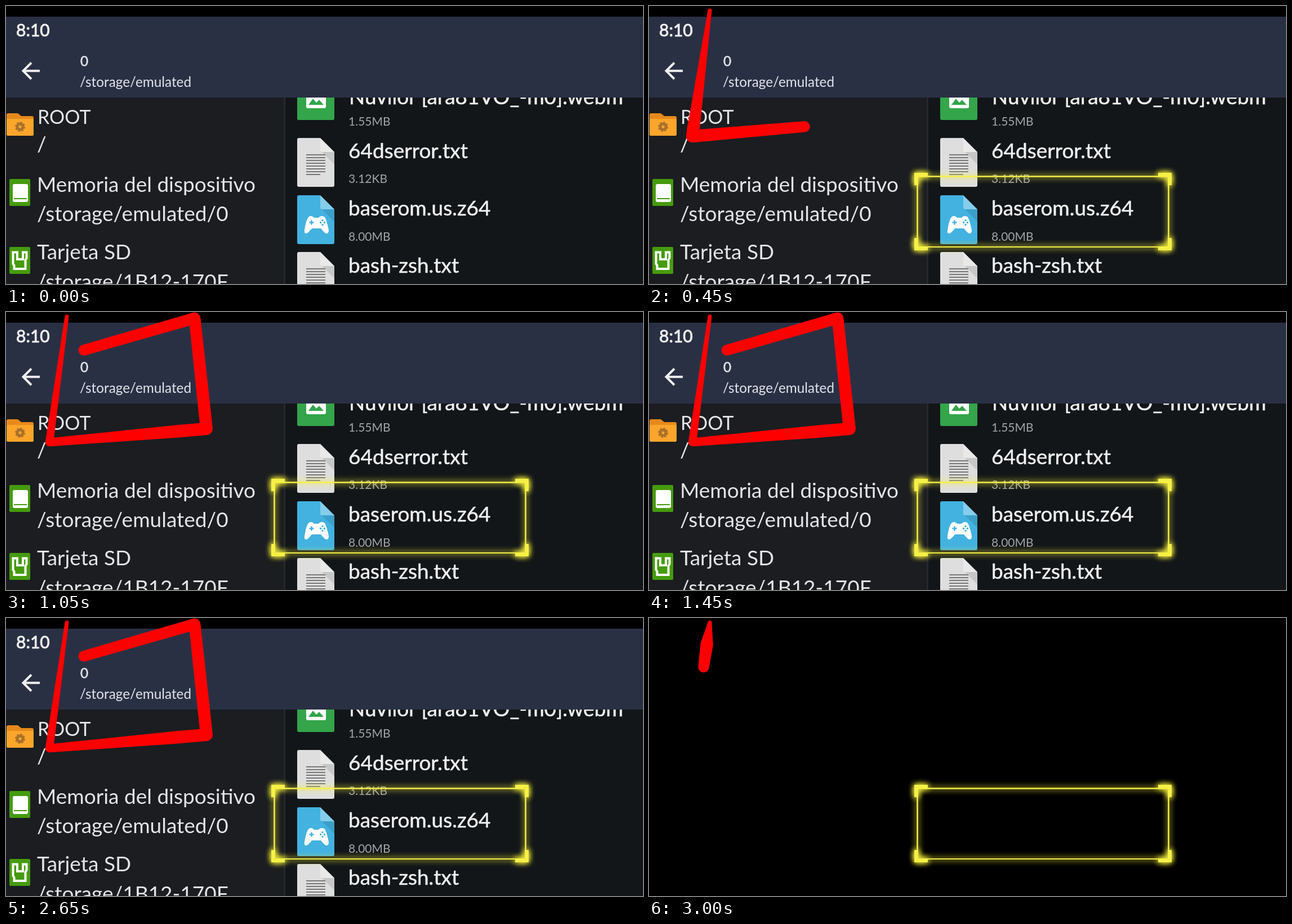
Write an HTML page with a canvas that moves like this. It is 1131 px wide and 495 px high and loops after 3050 ms.

```html
<!DOCTYPE html>
<html lang="es">
<head>
<meta charset="utf-8">
<title>File manager</title>
<style>
html, body { margin: 0; width: 100%; height: 100%; overflow: hidden; background: #000; }
svg, canvas { position: absolute; left: 0; top: 0; width: 1131px; height: 495px; }
text { font-family: Lato, "Open Sans", sans-serif; font-size: 37px; fill: #f1f1f1; }
.side { fill: #e4e5e7; }
.name { stroke: #f1f1f1; stroke-width: .5; }
.size { font-size: 21px; fill: #a3a5a7; }
.path { font-size: 24.3px; fill: #e3e5ec; }
.clock { font-size: 30px; stroke: #f1f1f1; stroke-width: .9; }
</style>
</head>
<body>
<svg id="screen" viewBox="0 0 1131 495">
  <defs>
    <clipPath id="list"><rect y="163" width="1131" height="332"/></clipPath>
    <g id="sheet">
      <path d="M520 0H558L583 25V84Q583 87 580 87H520Q517 87 517 84V3Q517 0 520 0Z"/>
      <path d="M558 0 583 25H561Q558 25 558 22Z" fill="#fff" fill-opacity=".35"/>
      <path d="M561 25H583V47Z" fill="#000" fill-opacity=".1"/>
    </g>
    <g id="doc">
      <use href="#sheet" fill="#dedede"/>
      <path d="M533 30H567M533 35H567M533 40H567M533 45H567M533 50H567M533 55H567M533 60H567M533 65H558" stroke="#777" stroke-width="2"/>
    </g>
  </defs>

  <rect y="19" width="1131" height="476" fill="#121619"/>
  <rect y="163" width="494" height="332" fill="#1b1d21"/>
  <rect x="493" y="163" width="3" height="332" fill="#25282c"/>
  <rect y="19" width="1131" height="144" fill="#2a3044"/>

  <text class="clock" x="18" y="54">8:10</text>
  <path d="M60 115.500H31M45 101 30.500 115.500 45 130" fill="none" stroke="#f1f1f1" stroke-width="4"/>
  <text class="path" x="132" y="107" stroke="#e3e5ec" stroke-width=".6">0</text>
  <text class="path" x="131" y="144">/storage/emulated</text>

  <path d="M1 194Q1 191 4 191H21L27 196H46Q49 196 49 199V205H1Z" fill="#e8891c"/>
  <rect x="1" y="201" width="48" height="30" rx="2" fill="#fba52a"/>
  <circle cx="25" cy="215" r="7.500" fill="none" stroke="#a9712b" stroke-width="3" stroke-dasharray="3.400 2.490"/>
  <circle cx="25" cy="215" r="5" fill="none" stroke="#a9712b" stroke-width="5"/>

  <rect x="6" y="308" width="37" height="48" rx="2" fill="#459b0d"/>
  <rect x="12" y="317" width="27" height="32" rx="3" fill="#fff"/>
  <path d="M14 343H37" stroke="#459b0d" stroke-width="2"/>

  <rect x="6" y="429" width="37" height="48" rx="2" fill="#459b0d"/>
  <path d="M12.500 438.500H20V451H30V438.500H36.500V449L34.500 452V468H14.500V462L12.500 459Z" fill="none" stroke="#fff" stroke-width="4"/>

  <g class="side">
    <text class="side" x="56" y="210" style="font-size:34px">ROOT</text>
    <text class="side" x="55" y="259">/</text>
    <text class="side" x="55" y="331">Memoria del dispositivo</text>
    <text class="side" x="55" y="383">/storage/emulated/0</text>
    <text class="side" x="55" y="451">Tarjeta SD</text>
    <text class="side" x="55" y="504">/storage/1B12-170F</text>
  </g>

  <g clip-path="url(#list)">
    <rect x="517" y="120" width="66" height="83" rx="3" fill="#34a54a"/>
    <rect x="533" y="150" width="35" height="32" rx="3" fill="#fff"/>
    <path d="M537 176 545 165 551 172 556 167 564 176Z" fill="#34a54a"/>
    <text class="name" x="609" y="175">Nuvilor [ara81VO_-m0].webm</text>
    <text class="size" x="608" y="213">1.55MB</text>

    <use href="#doc" y="235"/>
    <text class="name" x="608" y="271">64dserror.txt</text>
    <text class="size" x="608" y="315">3.12KB</text>

    <use href="#sheet" y="337" fill="#43b2e0"/>
    <path d="M538 375Q541 373 545 375L547 377H555L557 375Q561 373 565 375Q569 379 573 399Q573 405 569 405Q566 405 559 396H543Q536 405 533 405Q529 405 530 399Q533 379 538 375Z" fill="#fff"/>
    <path d="M538.500 385.500H546.500M542.500 381.500V389.500" stroke="#43b2e0" stroke-width="2.500"/>
    <path d="M562 380V383M562 388V391M557 385.500H560M564 385.500H567" stroke="#43b2e0" stroke-width="3"/>
    <text class="name" x="608" y="373">baserom.us.z64</text>
    <text class="size" x="608" y="417.500">8.00MB</text>

    <use href="#doc" y="438"/>
    <text class="name" x="608" y="475">bash-zsh.txt</text>
  </g>
</svg>
<canvas id="marks" width="1131" height="495"></canvas>

<script>
const LOOP = 3050, STEP = 50, CUT = 3000;
const START = 46, REDRAW = 2924, SPEED = 1.056;
const TRAIL = [[108, 8], [77, 232], [356, 208], [335, 11], [138, 68]];
const screenArt = document.getElementById('screen');
const ctx = document.getElementById('marks').getContext('2d');

const legs = TRAIL.slice(1).map((to, i) => {
  const from = TRAIL[i];
  return { from, to, len: Math.hypot(to[0] - from[0], to[1] - from[1]) };
});
const total = legs.reduce((sum, leg) => sum + leg.len, 0);

function pointAt(d) {
  let i = 0;
  while (i < legs.length - 1 && d > legs[i].len) d -= legs[i++].len;
  const { from, to, len } = legs[i];
  const k = d / len;
  return [from[0] + (to[0] - from[0]) * k, from[1] + (to[1] - from[1]) * k];
}

// The brush swells until halfway along what is drawn, then thins slightly.
const brushWidth = u => u < .5 ? 7 + 31 * u : 22.5 - 6 * (u - .5);

function drawBrush(t) {
  const since = t - (t >= REDRAW ? REDRAW : START);
  const len = Math.min(total, since * SPEED);
  if (len <= 0) return;
  ctx.fillStyle = '#f00';
  ctx.beginPath();
  for (let d = 0; d <= len; d++) {
    const [x, y] = pointAt(d), r = brushWidth(d / len) / 2;
    ctx.moveTo(x + r, y);
    ctx.arc(x, y, r, 0, 7);
  }
  ctx.fill();
}

function drawFrame(t) {
  if (t < START) return;
  const p = Math.min(1, (t - START) / 300);
  const scale = 1 - .5 * (1 - p) ** 3;
  const w = 457, h = 138;
  ctx.save();
  ctx.globalAlpha = Math.min(1, (t - START) / 100);
  ctx.translate(699.5, 366 + (1 - scale) * 40);
  ctx.scale(scale, scale);
  ctx.shadowColor = '#f4ee3c';
  ctx.shadowBlur = 11;
  ctx.strokeStyle = ctx.fillStyle = '#f5f046';
  ctx.lineWidth = 2;
  for (let pass = 0; pass < 2; pass++) {
    ctx.strokeRect(-w / 2 + 5.5, -h / 2 + 6.5, w - 11, h - 12.5);
    ctx.beginPath();
    for (const sx of [-1, 1]) for (const sy of [-1, 1]) {
      const x = sx * w / 2, y = sy * h / 2;
      ctx.moveTo(x, y);
      for (const [dx, dy] of [[24, 0], [24, 7], [7, 7], [7, 22], [0, 22]])
        ctx.lineTo(x - sx * dx, y - sy * dy);
      ctx.closePath();
    }
    ctx.fill();
  }
  ctx.restore();
}

function render(now) {
  const t = Math.floor(now % LOOP / STEP) * STEP;
  screenArt.style.visibility = t >= CUT ? 'hidden' : 'visible';
  ctx.clearRect(0, 0, 1131, 495);
  drawBrush(t);
  drawFrame(t);
}

const origin = performance.now();
function tick() {
  render(performance.now() - origin);
  requestAnimationFrame(tick);
}
tick();
</script>
</body>
</html>
```
